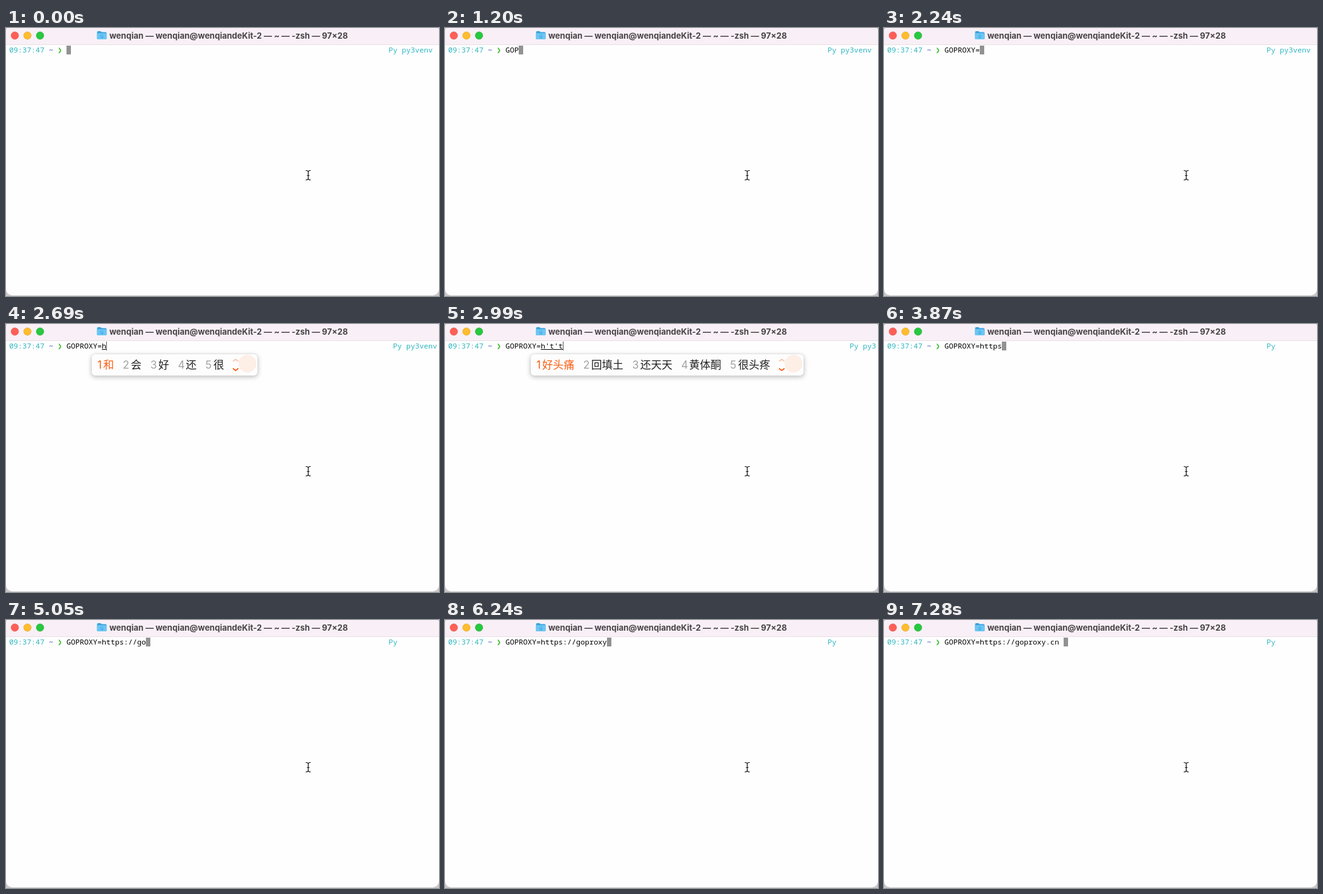
These frames come from a looping animation (687 by 426 pixels, 8 s). An HTML page:

```html
<!DOCTYPE html>
<html lang="en">
<head>
<meta charset="utf-8">
<title>Terminal</title>
<style>
  html, body { margin: 0; width: 100%; height: 100%; overflow: hidden; background: #c9c7c9; }
  div, span { position: absolute; white-space: pre; }
  #window { left: 0; top: 0; width: 687px; height: 425px; overflow: hidden; border-radius: 4px 4px 10px 10px; background: #fefefe; }
  #bar { left: 0; top: 0; width: 687px; height: 27px; background: #f8f0f6; border-bottom: 1px solid #e6e0e4; box-sizing: border-box; }
  #chrome { position: absolute; left: 0; top: 0; }
  #title { left: 164px; top: 0; font: 700 13px/24px Inter, "Open Sans", sans-serif; color: #474347; }
  .cell { top: 28px; height: 14px; font: 500 11.667px/14px "Noto Sans Mono", "DejaVu Sans Mono", monospace; color: #000; }
  .cyan { color: #2cb5c0; }
  #arrow { left: 82px; font: 700 11.6px/14px "DejaVu Sans Mono", "DejaVu Sans", monospace; color: #2fb41d; }
  #block { width: 7px; background: #929292; }
  #caret { width: 1px; background: #555; }
  #line { top: 40px; height: 1px; background: #000; }
  #popup, #shade { left: 136px; top: 48px; height: 34px; border-radius: 6px; }
  #shade { box-shadow: 0 2px 7px 1px rgba(0,0,0,.22), 0 0 1px rgba(0,0,0,.35); }
  #popup { display: flex; overflow: hidden; padding-left: 9px; background: #fdfdfd; font: 17px/34px Inter, "Noto Sans CJK SC", "Noto Sans CJK", sans-serif; color: #222; }
  #popup div { position: static; margin-right: 14px; flex: none; }
  #popup b { display: inline-block; width: 12.7px; font-weight: 400; color: #a2a2a2; }
  #popup div:first-child, #popup div:first-child b { color: #f85c12; }
  #popup div:first-child b { width: 9.3px; }
  #popup div svg { vertical-align: -1px; }
  #popup .end { flex: none; margin-left: -1px; }
</style>
</head>
<body>
<div id="window">
  <div id="bar"></div>
  <svg id="chrome" width="687" height="426" fill="none">
    <g stroke-width=".6">
      <circle cx="14" cy="12" r="6" fill="#fe5f57" stroke="#e24b41"/>
      <circle cx="34" cy="12" r="6" fill="#febc2e" stroke="#e1a325"/>
      <circle cx="54" cy="12" r="6" fill="#28c840" stroke="#1fac2f"/>
    </g>
    <path d="M144.500 7q0-2 1.500-2h4l1.500 1.500h6.500q1.500 0 1.500 1.500v8.500q0 1.500-1.500 1.500h-12q-1.500 0-1.500-1.500z" fill="#38a3dc"/>
    <rect x="144.500" y="8.300" width="15" height="9.700" rx="1.200" fill="#6bc6f4"/>
    <path d="M149.500 13l2.500-2.300 2.500 2.300M150.500 13v2.500h3V13" stroke="#43a5d8"/>
    <path d="M476 226.500q3.500 0 3.500 2.500v10q0 2.500-3.500 2.500M483 226.500q-3.500 0-3.500 2.500M483 241.500q-3.500 0-3.500-2.500M478 234.500h3" stroke="#111" stroke-width="1.200" stroke-linecap="round"/>
  </svg>
  <div id="title">wenqian — wenqian@wenqiandeKit-2 — ~ — -zsh — 97×28</div>

  <span class="cell cyan" style="left:5px">09:37:47</span>
  <span class="cell" style="left:68px;color:#3036b8">~</span>
  <span class="cell" id="arrow">❯</span>
  <span class="cell" id="input" style="left:96px"></span>
  <span class="cell cyan" id="prompt"></span>
  <div class="cell" id="block"></div>
  <div class="cell" id="caret"></div>
  <div id="line"></div>
  <div id="shade"></div>
  <div id="popup"></div>
</div>

<script>
const $ = id => document.getElementById(id);
const LOOP = 8000, CELL = 7, START = 96, RIGHT = 607, COMMIT = 3870;
const command = 'GOPROXY=https://goproxy.cn ';
const typedAt = [
  450, 600, 1200, 1350, 1500, 1800, 1950, 2240,
  COMMIT, COMMIT, COMMIT, COMMIT, COMMIT,
  4170, 4470, 4615, 4905, 5050, 5350, 5650, 5790,
  6090, 6240, 6530, 6830, 7130, 7280
];
const composedAt = [2690, 2840, 2990, 3140, 3580];
const choices = [
  '和 会 好 还 很',
  '后天 海豚 回头 好听 很疼',
  '好头痛 回填土 还天天 黄体酮 很头疼',
  'http ☁ 很体贴 黑头贴 好天天',
  'https ☁ http 很体贴 黑头贴'
].map(s => s.split(' '));

const cloud = `<svg width="27" height="13" fill="none" stroke="#333" stroke-width="1.300">
  <path d="M16 4.500h2a3.300 3.300 0 0 1 0 6.500h-5" stroke="#ccc"/>
  <path d="M5 11a3.500 3.500 0 0 1 0-7a4.500 4.500 0 0 1 8.500 0a3.500 3.500 0 0 1 0 7z"/>
  <circle cx="9.300" cy="7.300" r="2"/></svg>`;
const tail = `<svg class="end" width="40" height="34" fill="none" stroke-width="1.700" stroke-linecap="round">
  <circle cx="24" cy="15" r="14" fill="#fdeee6"/>
  <path d="M1.500 11l3.800-3 3.800 3" stroke="#fbc9b1"/>
  <path d="M1.500 23l3.800 3 3.800-3" stroke="#f85c12"/></svg>`;

const count = (times, t) => times.filter(x => x <= t).length;
const place = (el, col) => el.style.left = START + col * CELL + 'px';
const show = (el, on) => el.style.visibility = on ? 'visible' : 'hidden';

function showChoices(n) {
  $('popup').innerHTML = choices[n - 1].map((word, i) =>
    `<div><b>${i + 1}</b>${word === '☁' ? cloud : word}</div>`).join('') + tail;
  $('shade').style.width = $('popup').offsetWidth + 'px';
}

let last = '';
function draw(t) {
  const typed = count(typedAt, t);
  const keys = t < COMMIT ? count(composedAt, t) : 0;
  const state = typed + ':' + keys;
  if (state === last) return;
  last = state;

  const marked = 'https'.slice(0, keys).split('').join("'");
  const end = typed + marked.length;
  $('input').textContent = command.slice(0, typed) + marked;

  // Composed text pushes the right prompt past the last column.
  const room = 11 - marked.length;
  $('prompt').textContent = (t < COMMIT ? 'Py py3venv' : 'Py').slice(0, room);
  $('prompt').style.left = RIGHT + marked.length * CELL + 'px';

  place($('block'), end);
  place($('caret'), end);
  place($('line'), typed);
  $('line').style.width = marked.length * CELL + 'px';
  show($('block'), !keys);
  for (const id of ['caret', 'line', 'popup', 'shade']) show($(id), keys);
  if (keys) showChoices(keys);
}

function tick() {
  draw(performance.now() % LOOP);
  requestAnimationFrame(tick);
}
tick();
</script>
</body>
</html>
```
